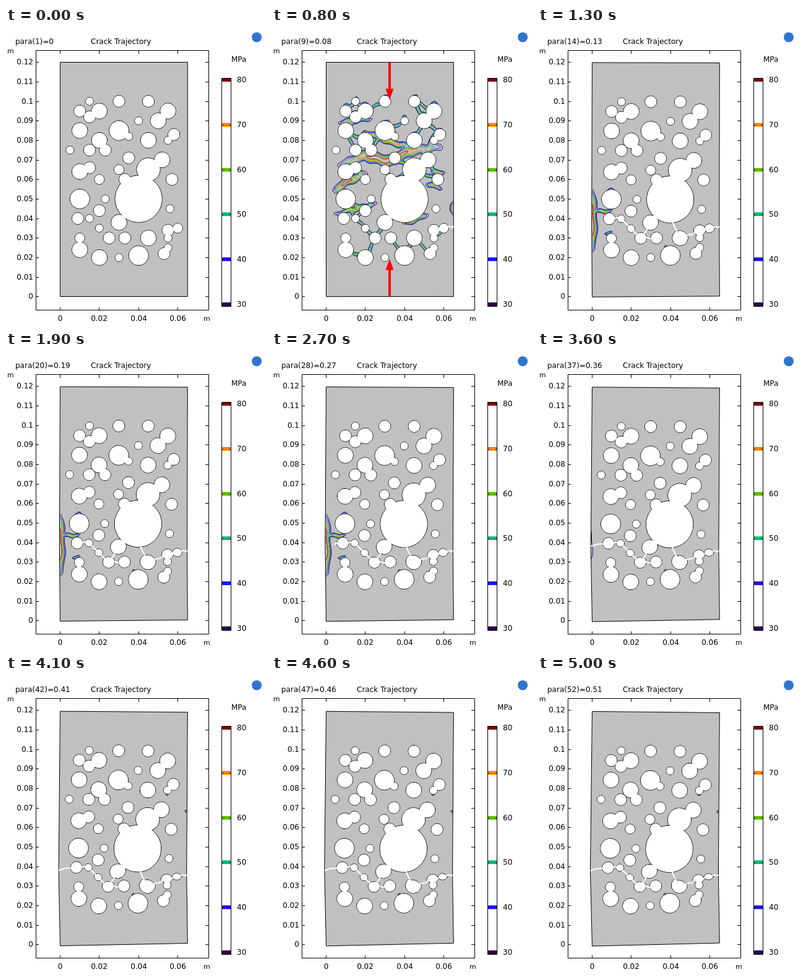
These frames come from a looping animation (420 by 480 pixels, 5.1 s). An HTML page with a canvas:

```html
<!DOCTYPE html>
<html lang="en">
<head>
<meta charset="utf-8">
<title>Crack Trajectory</title>
<style>
html, body { margin: 0; width: 100%; height: 100%; overflow: hidden; background: #fff; }
canvas { display: block; }
</style>
</head>
<body>
<canvas id="stage" width="420" height="480"></canvas>
<script>
const ctx = document.getElementById('stage').getContext('2d');
const STEP = 100, STEPS = 51;
const X0 = 87.5, X1 = 293.3, Y0 = 55.5, Y1 = 435.5, MM = 380 / 120;
const LEVELS = [30, 40, 50, 60, 70, 80];
const COLORS = ['#2d0050', '#2010f0', '#00bf70', '#60c000', '#ff8000', '#800000'];
const GREY = '#c0c0c0';

const toPx = ([x, y]) => [X0 + x * MM, Y1 - y * MM];

// Hole centres in millimetres, grouped by radius
const HOLES = {
  2: [[15,100], [40,90], [55,80], [35,82], [5,75], [23,50], [15,40], [56,45], [20,35],
      [55,30], [30,20], [55,25]],
  2.5: [[30,65], [20,60], [60,35], [10,30]],
  3: [[10,95], [15,92], [30,100], [45,100], [58,83], [23,75], [15,75], [35,71], [15,66],
      [33,60], [57,60], [20,44], [9,40], [25,30], [33,30], [55,34], [53,22]],
  4: [[20,95], [55,95], [50,90], [10,85], [20,80], [45,80], [52,70], [10,64], [30,38],
      [45,30], [10,24], [20,20]],
  5: [[30,85], [10,50], [40,21]],
  6: [[45,65]],
  12: [[40,50]]
};
const holes = Object.entries(HOLES).flatMap(([r, centres]) =>
  centres.map(c => ({ c: toPx(c), r: r * MM })));

// The crack runs from hole to hole, right edge to left edge
const CHAIN = [[65,36], [60,35], [55,34], [45,30], [41,39], [36,45], [30,38], [25,30],
  [20,35], [15,40], [9,40], [0,38.5]].map(toPx);
const CUT = [...CHAIN].reverse();
const SPUR = [[25,30], [33,30]].map(toPx);

// Main stress bands under full load: peak, then path
const BANDS = [
  [92, [112,222], [150,207], [190,216], [220,200], [270,192]],
  [78, [152,168], [195,186], [222,192]],
  [86, [103,265], [118,250], [150,236]],
  [74, [102,302], [168,285]],
  [74, [107,153], [160,147]],
  [74, [257,234], [278,234]],
  [74, [250,252], [275,260]],
  [78, [212,317], [252,302]],
  [80, [293,282], [293,300]],
  [74, [252,192], [272,164]]
].map(([peak, ...path]) => ({ peak, path, width: (peak - 55) / 4.2 }));

// Thin bands in the narrow diagonal gaps between neighbouring holes
const GAPS = holes.flatMap((a, i) => holes.slice(i + 1).flatMap(b => {
  const dx = Math.abs(a.c[0] - b.c[0]), dy = Math.abs(a.c[1] - b.c[1]);
  const gap = Math.hypot(dx, dy) - a.r - b.r;
  const diagonal = Math.min(dx, dy) > .4 * Math.max(dx, dy);
  return gap > 0 && gap < 4.5 * MM && diagonal ? [{ peak: 65, width: 3, path: [a.c, b.c] }] : [];
}));

const CAPS = holes.filter(h => h.c[1] < 185).map(({ c: [x, y], r }) => ({
  peak: 62, width: 2.5,
  path: [-.5, 0, .5].map(a => [x + r * Math.sin(a), y - r * Math.cos(a)])
}));

// Bending at the last ligament on the left edge
const BENDING = [
  { peak: 100, width: 9, path: [[86,265], [87,355]] },
  { peak: 75, width: 3.5, path: [[94,297], [120,296]] },
  { peak: 60, width: 2.5, path: [[107,332], [120,331]] },
  { peak: 50, width: 3, path: [[111,264], [118,261], [126,264]] }
];

// Small hot spots left after cracking: start, position
const SPOTS = [[.13, 185,325], [.13, 207,354], [.13, 261,346], [.38, 261,190], [.38, 293,216]];

function track(u, keys) {
  for (let i = 1; i < keys.length; i++) {
    const [a, va] = keys[i - 1], [b, vb] = keys[i];
    if (u <= b) return va + (vb - va) * (u - a) / (b - a);
  }
  return keys[keys.length - 1][1];
}

const loadAt = u => track(u, [[0, 0], [.08, 1], [.09, 1.05], [.11, .35], [.13, .035]]);
const slipAt = u => track(u, [[0, 0], [.08, .03], [.13, .27], [.51, 1]]);
const bendAt = u => track(u, [[.09, 0], [.13, 1], [.28, 1], [.36, .35], [.4, 0]]);

function random(seed) {
  const v = Math.sin(seed * 12.9898) * 43758.5453;
  return v - Math.floor(v);
}

function shift([x, y], slip, below) {
  const k = (x - X0) / (X1 - X0);
  const reach = below ? (Y1 - y) / 122 : (y - Y0) / 258;
  return [x - slip * (3 - k) * reach, y + slip * (below ? 2.5 - 5 * k : 2 + 2 * k)];
}
const isBelow = ([x, y]) => y > track(x, CUT);
const move = (p, slip) => shift(p, slip, isBelow(p));
function moveCrack(p, slip) {
  const a = shift(p, slip, false), b = shift(p, slip, true);
  return [(a[0] + b[0]) / 2, (a[1] + b[1]) / 2];
}

function trace(points, closed) {
  ctx.beginPath();
  points.forEach(([x, y]) => ctx.lineTo(x, y));
  if (closed) ctx.closePath();
}

function line(x1, y1, x2, y2) {
  ctx.beginPath();
  ctx.moveTo(x1, y1);
  ctx.lineTo(x2, y2);
  ctx.stroke();
}

function label(text, x, y, align = 'left', size = 12) {
  ctx.font = `${size}px "DejaVu Sans", sans-serif`;
  ctx.textAlign = align;
  ctx.fillStyle = '#000';
  ctx.fillText(text, x, y);
}

const CELL = 2, COLS = 106, ROWS = 192, field = new Float32Array(COLS * ROWS);
const gridX = i => X0 - 2 + i * CELL, gridY = j => Y0 - 2 + j * CELL;

function gridRange(values, pad, origin, count) {
  return [Math.max(0, Math.floor((Math.min(...values) - pad - origin) / CELL)),
    Math.min(count - 1, Math.ceil((Math.max(...values) + pad - origin) / CELL))];
}

function addRidge({ peak, width, path }, scale) {
  if (peak * scale < LEVELS[0]) return;
  const segs = path.length - 1, pad = width * 1.3 + 4;
  const [i0, i1] = gridRange(path.map(p => p[0]), pad, gridX(0), COLS);
  const [j0, j1] = gridRange(path.map(p => p[1]), pad, gridY(0), ROWS);
  for (let j = j0; j <= j1; j++) for (let i = i0; i <= i1; i++) {
    const x = gridX(i) + Math.sin(gridY(j) * .15), y = gridY(j) + 1.4 * Math.sin(gridX(i) * .27);
    const at = j * COLS + i;
    for (let s = 0; s < segs; s++) {
      const [ax, ay] = path[s], dx = path[s + 1][0] - ax, dy = path[s + 1][1] - ay;
      const t = Math.max(0, Math.min(1, ((x - ax) * dx + (y - ay) * dy) / (dx * dx + dy * dy)));
      const d2 = (x - ax - t * dx) ** 2 + (y - ay - t * dy) ** 2;
      const taper = 1 - .55 * (2 * (s + t) / segs - 1) ** 2;
      field[at] = Math.max(field[at], peak * scale * taper * Math.exp(-d2 / (width * width)));
    }
  }
}

function drawContours(u, slip) {
  field.fill(0);
  [...BANDS, ...GAPS, ...CAPS].forEach(r => addRidge(r, loadAt(u)));
  BENDING.forEach(r => addRidge(r, bendAt(u)));
  SPOTS.filter(([start]) => u >= start).forEach(([, x, y]) =>
    addRidge({ peak: 46, width: 3, path: [[x - 3, y], [x + 3, y]] }, 1));

  ctx.lineWidth = 1;
  LEVELS.forEach((level, n) => {
    ctx.strokeStyle = COLORS[n];
    ctx.beginPath();
    for (let j = 0; j < ROWS - 1; j++) for (let i = 0; i < COLS - 1; i++) {
      const corners = [[i, j], [i + 1, j], [i + 1, j + 1], [i, j + 1]];
      const values = corners.map(([a, b]) => field[b * COLS + a]);
      const hits = [];
      for (let e = 0; e < 4; e++) {
        const g = (e + 1) % 4, a = corners[e], b = corners[g];
        if ((values[e] < level) === (values[g] < level)) continue;
        const f = (level - values[e]) / (values[g] - values[e]);
        hits.push(move([gridX(a[0] + f * (b[0] - a[0])), gridY(a[1] + f * (b[1] - a[1]))], slip));
      }
      for (let h = 0; h + 1 < hits.length; h += 2) {
        ctx.moveTo(...hits[h]);
        ctx.lineTo(...hits[h + 1]);
      }
    }
    ctx.stroke();
  });
}

// Holes lying on the cut are squeezed; the others move with their block
function ring({ c: [x, y], r }, inset, slip) {
  const onCut = Math.abs(y - track(x, CUT)) < 4;
  return Array.from({ length: 72 }, (_, i) => {
    const a = i * Math.PI / 36;
    const p = [x + (r - inset) * Math.cos(a), y + (r - inset) * Math.sin(a)];
    return shift(p, slip, isBelow(onCut ? p : [x, y]));
  });
}

function drawHoles(slip) {
  ctx.lineWidth = 1;
  ctx.strokeStyle = '#000';
  ctx.fillStyle = '#fff';
  holes.forEach(h => { trace(ring(h, 0, slip), true); ctx.fill(); ctx.stroke(); });
  holes.forEach(h => { trace(ring(h, .5, slip), true); ctx.fill(); });
}

function drawCrack(from, to, part, slip, seed) {
  const points = Array.from({ length: 6 }, (_, i) => {
    const f = part * i / 5, jitter = i % 5 ? 3 * (random(seed * 7 + i) - .5) : 0;
    return moveCrack([from[0] + f * (to[0] - from[0]) + jitter,
      from[1] + f * (to[1] - from[1]) + jitter], slip);
  });
  trace(points);
  ctx.stroke();
}

function drawCracks(u, slip) {
  ctx.strokeStyle = '#fff';
  ctx.lineWidth = 2;
  const last = CHAIN.length - 2;
  for (let i = 0; i < last; i++) {
    if (u >= .075 + .006 * Math.max(0, i - 1)) drawCrack(CHAIN[i], CHAIN[i + 1], 1, slip, i);
  }
  if (u >= .11) drawCrack(...SPUR, 1, slip, last + 1);
  const growth = track(u, [[.15, 0], [.22, .3], [.27, .5], [.36, 1]]);
  if (u > .15) drawCrack(CHAIN[last], CHAIN[last + 1], growth, slip, last);
}

function drawPlate(u, slip) {
  const outline = [move([X0, Y0], slip), move([X1, Y0], slip), moveCrack(CHAIN[0], slip),
    move([X1, Y1], slip), move([X0, Y1], slip), moveCrack(CUT[0], slip)];
  trace(outline, true);
  ctx.fillStyle = GREY;
  ctx.fill();
  ctx.save();
  ctx.clip();
  drawContours(u, slip);
  ctx.restore();
  trace(outline, true);
  ctx.strokeStyle = '#000';
  ctx.lineWidth = 1;
  ctx.stroke();
  drawHoles(slip);
  drawCracks(u, slip);
}

function drawArrow(y, dir, size) {
  if (!size) return;
  ctx.save();
  ctx.translate(190, y);
  ctx.scale(size, size * dir);
  ctx.fillStyle = '#f00';
  trace([[-2, 0], [2, 0], [2, 43], [6.5, 43], [0, 61], [-6.5, 43], [-2, 43]], true);
  ctx.fill();
  ctx.restore();
}

function drawAxes() {
  ctx.strokeStyle = '#000';
  ctx.lineWidth = 1;
  ctx.strokeRect(48.5, 36.5, 279, 421);
  for (let i = 0; i <= 12; i++) {
    const y = Math.ceil(435 - i * 10 * MM) + .5;
    line(48, y, 53, y);
    line(322, y, 328, y);
    label(String(i / 100), 44, y + 3.5, 'right');
  }
  for (let i = 0; i <= 6; i += 2) {
    const x = Math.round(87 + i * 10 * MM) + .5;
    line(x, 36, x, 42);
    line(x, 453, x, 458);
    label(String(i / 100), x, 475, 'center');
  }
  label('m', 2, 41, 'left', 11);
  label('m', 319, 475, 'left', 11);
}

function drawLegend() {
  label('MPa', 364, 55);
  ctx.strokeStyle = '#000';
  LEVELS.forEach((level, i) => {
    const y = Math.round(448 - i * 72.8);
    ctx.fillStyle = COLORS[i];
    ctx.fillRect(348, y - 3, 16, 6);
    line(348, y + .5, 351, y + .5);
    line(361, y + .5, 364, y + .5);
    label(String(level), 373, y + 4);
  });
  ctx.strokeRect(348.5, 81.5, 15, 370);
}

function draw(index) {
  const n = index === STEPS - 1 ? STEPS + 1 : index + 1;
  const u = (n - 1) / 100, slip = slipAt(u);
  ctx.fillStyle = '#fff';
  ctx.fillRect(0, 0, 420, 480);
  drawAxes();
  drawLegend();
  label(`para(${n})=${u}`, 15, 26);
  label('Crack Trajectory', 137, 26);
  ctx.fillStyle = '#2f74d0';
  ctx.beginPath();
  ctx.arc(405, 15, 8, 0, Math.PI * 2);
  ctx.fill();
  drawPlate(u, slip);
  drawArrow(Y0 + 2 * slip, 1, loadAt(u));
  drawArrow(Y1, -1, loadAt(u));
}

ctx.lineJoin = 'round';
let shown = -1;
function tick() {
  const index = Math.floor(performance.now() / STEP) % STEPS;
  if (index !== shown) draw(shown = index);
  requestAnimationFrame(tick);
}
tick();
</script>
</body>
</html>
```
